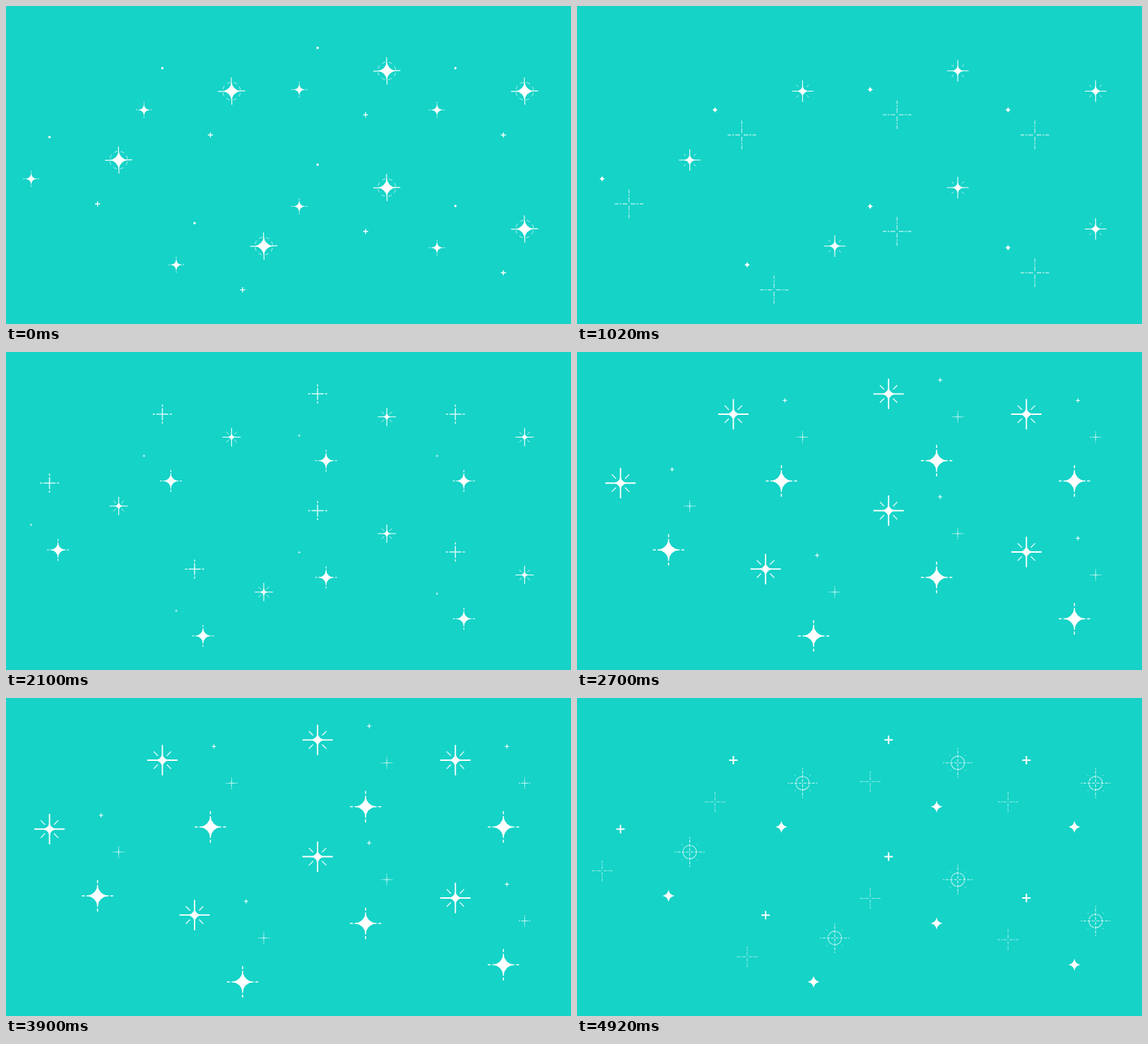
These frames come from a looping animation (800 px wide and 450 px high, 5010 ms). An HTML page with a canvas:

```html
<!DOCTYPE html>
<html lang="en">
<head>
<meta charset="utf-8">
<title>Twinkling stars</title>
<style>
html, body { margin: 0; width: 100%; height: 100%; overflow: hidden; background: #15d3c7; }
canvas { display: block; }
</style>
</head>
<body>
<canvas id="sky" width="800" height="450"></canvas>
<script>
const ctx = document.getElementById('sky').getContext('2d');
const LOOP = 5010, STEP = 120, CYCLE = 10;

function stroke(width, alpha, dash = []) {
  ctx.lineWidth = width;
  ctx.globalAlpha = alpha;
  ctx.setLineDash(dash);
  ctx.stroke();
  ctx.globalAlpha = 1;
}

// Four lines pointing outwards, a quarter turn apart
function spokes(from, to, width, { turn = 0, alpha = 1, dash } = {}) {
  ctx.beginPath();
  for (let i = 0; i < 4; i++) {
    const a = turn + i * Math.PI / 2, c = Math.cos(a), s = Math.sin(a);
    ctx.moveTo(from * c, from * s);
    ctx.lineTo(to * c, to * s);
  }
  stroke(width, alpha, dash);
}

const diagonals = (from, to, width, alpha) =>
  spokes(from, to, width, { turn: Math.PI / 4, alpha });

function ring(r, width, alpha, count, fill) {
  const slot = 2 * Math.PI * r / count;
  ctx.beginPath();
  ctx.arc(0, 0, r, 0.2, 0.2 + 2 * Math.PI);
  stroke(width, alpha, [slot * fill, slot * (1 - fill)]);
}

function body(r) {
  const pinch = r * 0.16;
  ctx.beginPath();
  ctx.moveTo(r, 0);
  for (let i = 0; i < 4; i++) {
    const a = i * Math.PI / 2, c = Math.cos(a), s = Math.sin(a);
    ctx.quadraticCurveTo(pinch * (c - s), pinch * (c + s), -r * s, r * c);
  }
  ctx.fill();
}

function dot(r) {
  ctx.beginPath();
  ctx.arc(0, 0, r, 0, 7);
  ctx.fill();
}

// Each life maps its age in steps to a pose
function burst(age) {
  if (age == 0) dot(1.7);
  if (age == 1) spokes(0, 6, 2);
  if (age >= 2 && age <= 4) {
    const grow = age - 2;
    body(9.5 + 4 * grow);
    spokes(0, 21.5 + 4 * grow, 1.8);
    diagonals(9 + 5 * grow, 17.5 + 3 * grow, 1.4, 0.9);
  }
  if (age == 5) {
    body(21);
    spokes(0, 32, 1.9, { turn: -0.02 });
    ring(21, 1.4, 0.8, 8, 0.55);
  }
  if (age == 6) {
    ring(16, 1.7, 0.75, 4, 0.93);
    spokes(2, 35, 1.8, { alpha: 0.75, dash: [7, 3] });
    diagonals(24, 27, 1.6, 0.7);
  }
  if (age == 7) spokes(0, 13.5, 1.5, { alpha: 0.85, dash: [8.5, 2] });
}

function flicker(age) {
  if (age == 0) spokes(0, 3, 1.1);
  if (age == 1) body(7);
  if (age == 2) {
    body(11);
    spokes(0, 12, 1.1);
  }
  if (age == 3) {
    body(12);
    spokes(0, 18.5, 1.3, { dash: [13, 2] });
  }
  if (age == 4) spokes(3, 24, 1.5, { alpha: 0.65, dash: [8, 2, 3, 2] });
}

// The quick flicker skips its third pose
const quick = age => flicker(age < 2 ? age : age + 1);

const star = (x, y, size, start, life) => ({ x, y, size, start, life });
const cluster = [
  star(0, 0, 1, 0, burst),
  star(98, 32.5, 0.6, 5, burst),
  star(73, -19.5, 1, 2, flicker),
  star(-26, 59, 0.61, 7, flicker),
  star(68, 94.5, 1.2, 0, quick),
  star(12, 94.5, 0.84, 5, quick)
];

const places = [[221.4, 88], [441.2, 59.3], [636.3, 88], [61.6, 185.5],
  [441.2, 224.5], [636.3, 283], [267, 307.2]];

function draw() {
  const step = Math.floor(performance.now() % LOOP / STEP) % CYCLE;
  ctx.fillStyle = '#15d3c7';
  ctx.fillRect(0, 0, 800, 450);
  ctx.fillStyle = ctx.strokeStyle = '#fff';
  for (const [px, py] of places) {
    for (const { x, y, size, start, life } of cluster) {
      ctx.setTransform(size, 0, 0, size, px + x, py + y);
      life((step - start + CYCLE) % CYCLE);
    }
  }
  ctx.resetTransform();
  requestAnimationFrame(draw);
}
draw();
</script>
</body>
</html>
```
